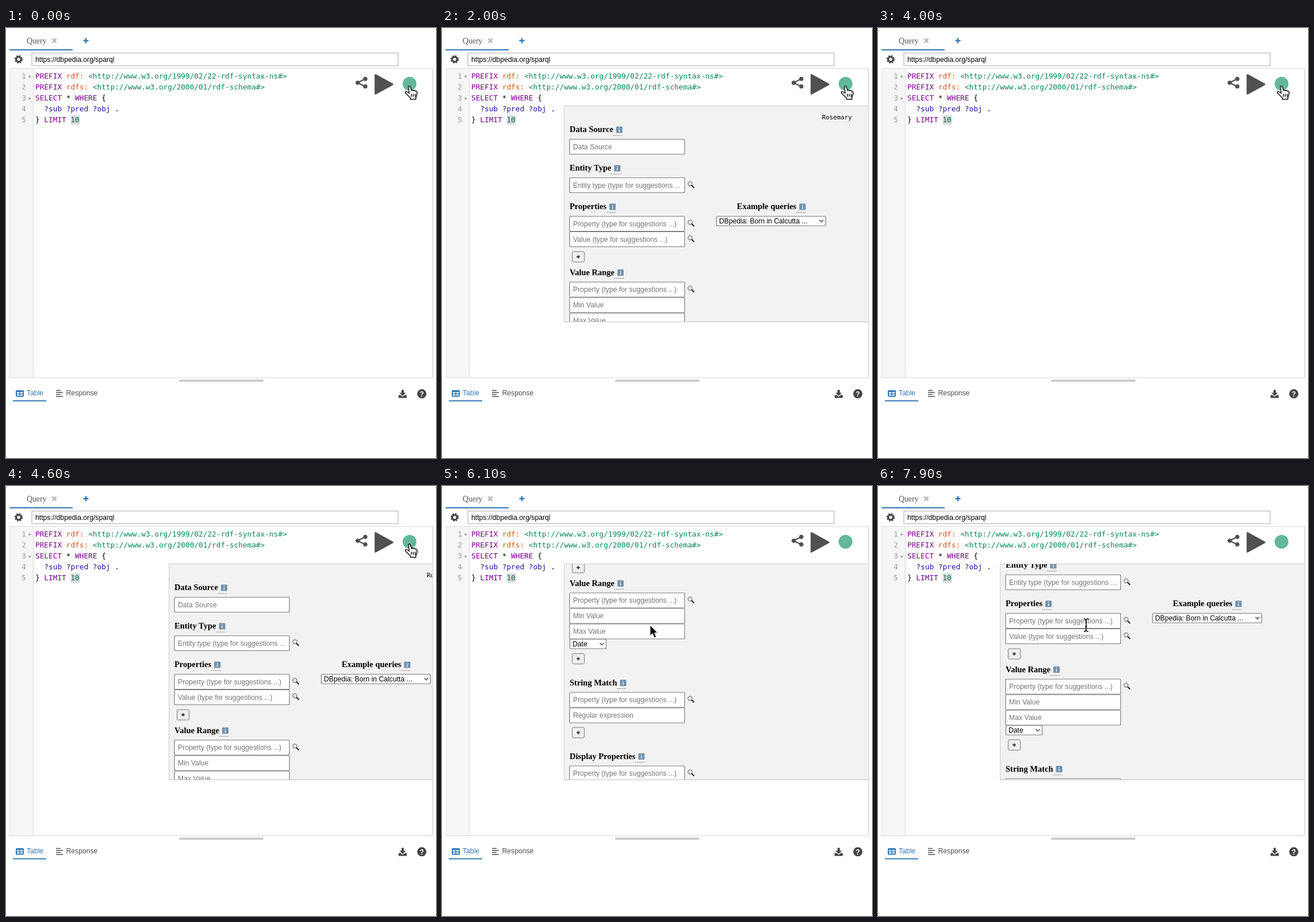
Write an HTML page that moves like this. It is 748 px wide and 748 px high and loops after 8 s.

```html
<!DOCTYPE html>
<html lang="en">
<head>
<meta charset="utf-8">
<title>Query editor</title>
<style>
  html, body { margin: 0; width: 100%; height: 100%; overflow: hidden; background: #fff; }
  svg { display: block; width: 100vw; height: 100vh; }
  text { white-space: pre; }
  .sans { font: 12.2px "Liberation Sans", Arial, sans-serif; }
  .serif { font: 13.8px "Liberation Serif", serif; }
  .head { font: bold 14.5px "Liberation Serif", serif; }
  .code { font: 12.76px "DejaVu Sans Mono", monospace; }
  .hint { fill: #757575; }
  .kw { fill: #708; }
  .prefix { fill: #dc5318; }
  .uri { fill: #08855a; }
  .var { fill: #219; }
  .num { fill: #164; }
  .box { fill: #fff; stroke: #7d7d7d; stroke-width: 1.2; }
  .line { fill: none; stroke: #444; }
</style>
</head>
<body>
<svg viewBox="0 0 748 748">
  <defs>
    <clipPath id="view"><rect x="48" y="135" width="694" height="377"/></clipPath>
    <clipPath id="inner"><rect y="136" width="540" height="375"/></clipPath>
  </defs>

  <g id="tabs">
    <text class="serif" x="36" y="27" fill="#555">Query</text>
    <path d="M80.5 18.5l7 7m0-7l-7 7" stroke="#bbb" stroke-width="2.8"/>
    <path d="M134.5 22h9m-4.5-4.5v9" stroke="#337ab7" stroke-width="2.4"/>
    <rect x="6" y="37" width="110" height="2" fill="#337ab7"/>
  </g>

  <g id="page">
    <g class="line">
      <circle cx="22" cy="54.5" r="4.2" stroke-width="3"/>
      <circle cx="22" cy="54.5" r="6" stroke-width="2.4" stroke-dasharray="2.6 2.112"/>
    </g>
    <rect x="45" y="43.5" width="637" height="22" fill="#fff" stroke="#d2d2d2" stroke-width="2"/>
    <text class="sans" x="51" y="58.7">https://dbpedia.org/sparql</text>

    <rect x="7" y="70.5" width="735" height="538" fill="#fff" stroke="#d8d8d8"/>
    <rect x="7.5" y="71" width="40" height="537" fill="#f6f6f6"/>
    <path d="M47.5 71v537" stroke="#ddd"/>
    <rect x="112.5" y="152" width="16" height="16" fill="#d7dbdd"/>
    <g id="code" class="code"></g>

    <g stroke="#505050" fill="#505050">
      <path d="M625 88.5L611.5 95.2L625 101.7" fill="none" stroke-width="2.3"/>
      <circle cx="611.8" cy="95.2" r="3.3"/>
      <circle cx="625" cy="88.5" r="3.3"/>
      <circle cx="625" cy="101.7" r="3.3"/>
      <path d="M642.5 81.5L672.5 98L642.5 114.5z" stroke-width="2.6" stroke-linejoin="round"/>
    </g>
    <circle cx="702" cy="97" r="12" fill="#62b898"/>

    <g clip-path="url(#view)">
      <g id="panel">
        <rect x=".5" y="135.5" width="540" height="375.5" fill="#f2f2f2" stroke="#ccc"/>
        <g clip-path="url(#inner)"><g id="form"></g></g>
        <path d="M0 135.5h540M0 511h540" stroke="#ccc"/>
      </g>
    </g>
    <path d="M742 71v537" stroke="#d8d8d8"/>

    <rect x="301" y="611.5" width="147" height="4" rx="1.5" fill="#ccc"/>
    <rect x="17" y="630" width="14" height="11.5" rx="1.5" fill="#337ab7"/>
    <path d="M19 634.5h4.3m1.5 0h4.3M19 638.3h4.3m1.5 0h4.3" stroke="#fff" stroke-width="2.3"/>
    <text class="sans" x="36" y="639.3" fill="#337ab7">Table</text>
    <rect x="12" y="647.5" width="58" height="2" fill="#337ab7"/>
    <path d="M87 630.5h8m-8 3.5h12m-12 3.5h8m-8 3.5h12" stroke="#505050" stroke-width="1.6"/>
    <text class="sans" x="104.5" y="639.3" fill="#505050">Response</text>
    <path d="M688 629.5h4v5h3.5l-5.5 5.5l-5.5-5.5h3.5zM683 638.5h3.5l3.5 3l3.5-3h3.5v5h-14z" fill="#444"/>
    <circle cx="723.3" cy="636.3" r="8" fill="#444"/>
    <text class="sans" x="723.3" y="641" fill="#fff" text-anchor="middle" style="font-weight:bold">?</text>
  </g>

  <g id="cursor" stroke-linejoin="round">
    <path id="hand" fill="#fff" stroke="#111" stroke-width="1.5"
      d="M-2 1.5C-2-.5 1-.5 1.5 1.5L3.5 8C4 6.5 6.5 6.5 6.8 8.2C7.5 7 9.6 7.3 9.8 9C11 8 12.8 8.8 13 10.5C13.5 15 12.5 17 11 19V23H1.5V20.5C-1.5 18-4 15-7 12.2C-8.5 10.5-6 8.5-4 10L-.5 12.5zM3.2 13.5v5m3.3-5v5m3.3-5v5"/>
    <path id="arrow" fill="#000" stroke="#fff" d="M0 0V18.5L4.2 14.6L7.3 22L10.7 20.6L7.6 13.5H13z"/>
    <path id="beam" fill="none" stroke="#111" stroke-width="1.6" d="M-4-11Q0-11 0-8Q0-11 4-11M0-8V8M-4 11Q0 11 0 8Q0 11 4 11M-2 2.5H2"/>
  </g>
</svg>

<script>
const $ = id => document.getElementById(id);

function add(parent, tag, attrs, text) {
  const node = document.createElementNS("http://www.w3.org/2000/svg", tag);
  for (const key in attrs) node.setAttribute(key, attrs[key]);
  if (text) node.textContent = text;
  parent.append(node);
  return node;
}

// Each token is [class, text].
const lines = [
  [["kw", "PREFIX "], ["prefix", "rdf: "], ["uri", "<http://www.w3.org/1999/02/22-rdf-syntax-ns#>"]],
  [["kw", "PREFIX "], ["prefix", "rdfs: "], ["uri", "<http://www.w3.org/2000/01/rdf-schema#>"]],
  [["kw", "SELECT "], ["", "* "], ["kw", "WHERE "], ["", "{"]],
  [["var", "  ?sub ?pred ?obj "], ["", "."]],
  [["", "} "], ["kw", "LIMIT "], ["num", "10"]]
];
lines.forEach((tokens, i) => {
  const y = 88 + i * 19.1;
  add($("code"), "text", { x: 35, y, fill: "#999", "text-anchor": "end" }, String(i + 1));
  if (i === 0 || i === 2) add($("code"), "path", { d: `M38.5 ${y - 5}h5l-2.5 4z`, fill: "#999" });
  const row = add($("code"), "text", { x: 51, y });
  for (const [cls, text] of tokens) add(row, "tspan", { class: cls }, text);
});

const form = $("form");

function heading(label, y, x = 10) {
  const text = add(form, "text", { class: "head", x, y: y + 4.5 }, label);
  const end = x + text.getComputedTextLength();
  add(form, "rect", { x: end + 5, y: y - 5, width: 11, height: 11, rx: 1, fill: "#7292ae" });
  add(form, "path", { d: `M${end + 10.5} ${y - 3}v1.6m0 1.2v4.5`, stroke: "#e8eef3", "stroke-width": 1.5 });
  add(form, "path", { d: `M${end} ${y + 10.5}h16`, stroke: "#555", "stroke-dasharray": "1.5 1.5" });
}

function field(label, y, searchable) {
  add(form, "rect", { class: "box", x: 10, y: y + .5, width: 200, height: 26, rx: 1 });
  add(form, "text", { class: "sans hint", x: 16, y: y + 17.5 }, label);
  if (!searchable) return;
  add(form, "circle", { cx: 219.5, cy: y + 11, r: 3.6, fill: "#e3edf2", stroke: "#777", "stroke-width": 1.2 });
  add(form, "path", { d: `M222 ${y + 13.5}l4.5 4.5`, stroke: "#333", "stroke-width": 2.4 });
}

function plus(y) {
  add(form, "rect", { x: 14.5, y: y - 9, width: 21, height: 18, rx: 2, fill: "#efefef", stroke: "#777" });
  add(form, "path", { d: `M22 ${y}h6m-3-3v6`, stroke: "#111", "stroke-width": 1.3 });
}

function select(label, x, y, width) {
  add(form, "rect", { class: "box", x, y, width, height: 16.5, rx: 2 });
  add(form, "text", { class: "sans", x: x + 4.5, y: y + 12.5 }, label);
  add(form, "path", { class: "line", d: `M${x + width - 11} ${y + 6.5}l3.5 3.5l3.5-3.5`, "stroke-width": 1.3 });
}

const property = "Property (type for suggestions ...)";
add(form, "text", { class: "code", x: 449, y: 159, style: "font-size:10.8px" }, "Rosemary");
heading("Data Source", 176.5);
field("Data Source", 193);
heading("Entity Type", 243.5);
field("Entity type (type for suggestions ...", 260, true);
heading("Properties", 310.5);
field(property, 327, true);
field("Value (type for suggestions ...)", 354, true);
plus(398);
heading("Example queries", 310.5, 301);
select("DBpedia: Born in Calcutta ...", 265.5, 327.5, 190);
heading("Value Range", 425);
field(property, 441.5, true);
field("Min Value", 468.5);
field("Max Value", 495.5);
select("Date", 10.5, 522.5, 63);
plus(556.5);
heading("String Match", 598);
field(property, 614.5, true);
field("Regular expression", 641.5);
plus(685);
heading("Display Properties", 726);
field(property, 742.5, true);
plus(786);
heading("Max # of results", 827);
field("Limit", 843.5);

const span = (t, start, length) => Math.min(1, Math.max(0, (t - start) / length));
const smooth = v => v * v * (3 - 2 * v);

// The standard CSS "ease" curve, solved by bisection.
function ease(x) {
  let lo = 0, hi = 1, s = .5;
  for (let i = 0; i < 24; i++) {
    s = (lo + hi) / 2;
    if (.75 * s * (1 - s) + s ** 3 < x) lo = s; else hi = s;
  }
  return .3 * s * (1 - s) ** 2 + 3 * s * s * (1 - s) + s ** 3;
}

const SLIDE = 700, MAX_SCROLL = 382;

function draw(t) {
  const slide = start => ease(span(t, start, SLIDE));
  const open = slide(771) - slide(2458) + slide(4199);
  $("panel").setAttribute("transform", `translate(${Math.round(742 - 530 * open)})`);
  $("panel").style.display = open < .001 ? "none" : "";

  const down = 1 - (1 - span(t, 5800, 704)) ** 2;
  const up = smooth(span(t, 7500, 612));
  form.setAttribute("transform", `translate(0 ${-Math.round(MAX_SCROLL * (down - up))})`);
  $("page").setAttribute("transform", `translate(0 ${t >= 6700 && t < 7600 ? -1 : 0})`);

  const move = smooth(span(t, 5250, 500));
  $("cursor").setAttribute("transform", `translate(${702 - 340 * move} ${101 + 141 * move})`);
  const shape = move < .06 ? "hand" : t < 6600 ? "arrow" : "beam";
  for (const id of ["hand", "arrow", "beam"]) $(id).style.display = id === shape ? "" : "none";
}

function tick() {
  draw(Math.floor(performance.now() % 8000 / 100) * 100);
  requestAnimationFrame(tick);
}
tick();
</script>
</body>
</html>
```
